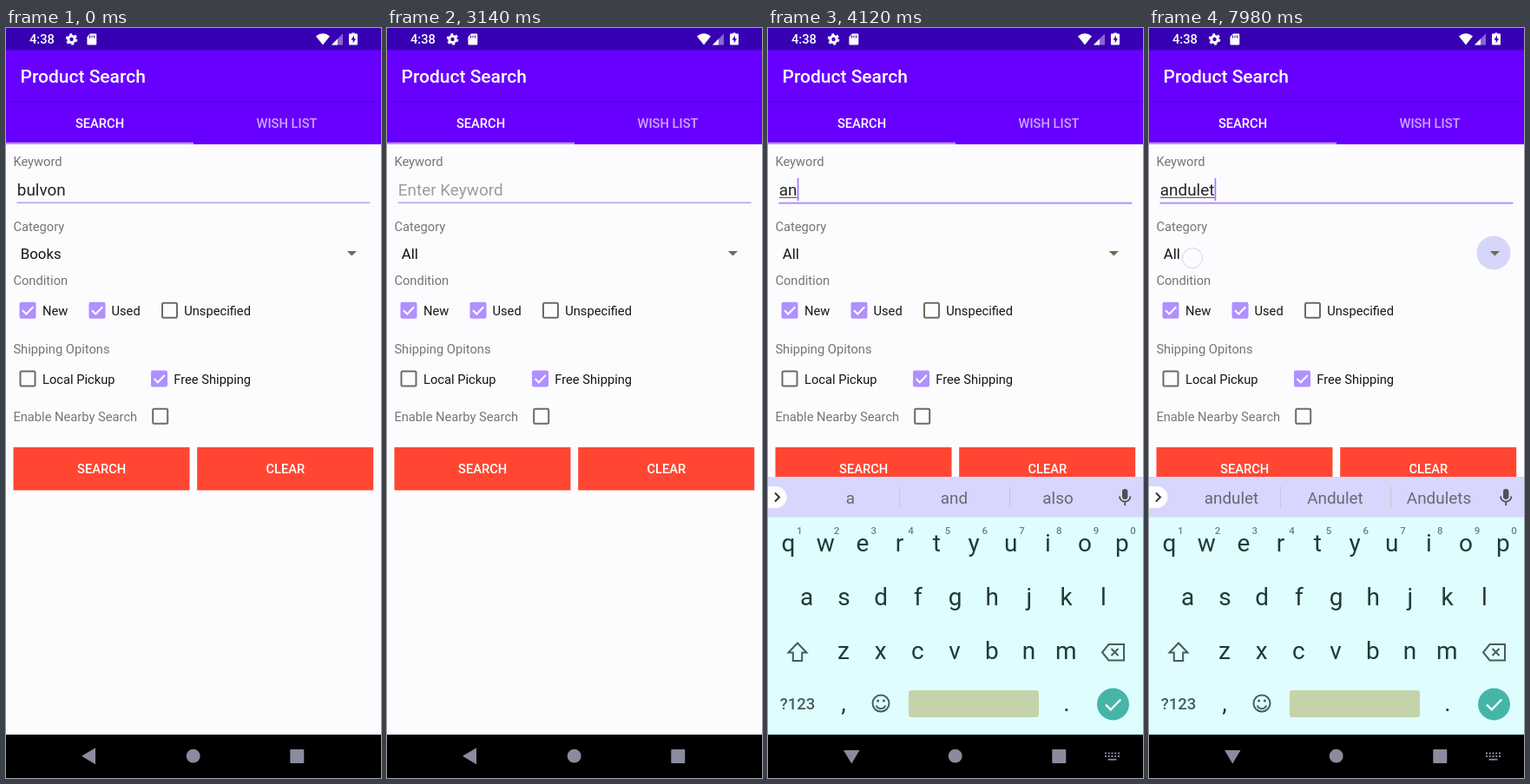
Recreate the animation shown at these times as an HTML page. Size 432 px wide and 864 px high, loop 8000 ms.

```html
<!DOCTYPE html>
<html lang="en">
<head>
<meta charset="utf-8">
<title>Product Search</title>
<style>
html, body { margin: 0; width: 100%; height: 100%; overflow: hidden; background: #fcfcff; }
svg { display: block; width: 100vw; height: 100vh; font-family: Roboto, sans-serif; }
text { white-space: pre; }
.mid { text-anchor: middle; }
.med { font-weight: 500; }
</style>
</head>
<body>
<svg id="stage" viewBox="0 0 432 864">
  <rect width="432" height="864" fill="#fcfcff"/>

  <!-- status bar, toolbar and tabs -->
  <rect width="432" height="134" fill="#6800ff"/>
  <rect width="432" height="25.5" fill="#3700b3"/>
  <rect y="84.5" width="432" height="1" fill="#5200d8"/>
  <g fill="#fff" class="med">
    <text x="27" y="18" font-size="14.7">4:38</text>
    <circle cx="75.5" cy="13" r="3.7" fill="none" stroke="#fff" stroke-width="3"/>
    <circle cx="75.5" cy="13" r="5.8" fill="none" stroke="#fff" stroke-width="2" stroke-dasharray="3 3.07"/>
    <path d="M97 6.5h6a1.3 1.3 0 0 1 1.3 1.3v10.4a1.3 1.3 0 0 1-1.3 1.3h-8.3a1.3 1.3 0 0 1-1.3-1.3V10.300z"/>
    <path d="M96.500 8.500v3M99 8.500v3M101.500 8.500v3" stroke="#3700b3"/>
    <path d="M357 9.500Q365 3 373 9.500L365 19.500z"/>
    <path d="M388 6.500v13h-13z" opacity=".4"/>
    <path d="M382 12.500v7h-7z"/>
    <path d="M398.500 6.500v-1h3v1h2.500a1 1 0 0 1 1 1v11a1 1 0 0 1-1 1h-8a1 1 0 0 1-1-1v-11a1 1 0 0 1 1-1z"/>
    <path d="M401 8.500l-3.500 5.300h2.200v3.700l3.300-5.200h-2z" fill="#3700b3"/>
    <text x="16.500" y="62.700" font-size="21">Product Search</text>
    <g font-size="14.7" class="mid">
      <text x="108" y="115">SEARCH</text>
      <text x="323.500" y="115" fill="#cba6ff">WISH LIST</text>
    </g>
  </g>
  <rect y="131.700" width="216" height="2.300" fill="#bb90ff"/>

  <!-- form -->
  <g font-size="14.7" fill="#757575">
    <text x="8.400" y="158.500">Keyword</text>
    <text x="8.400" y="234.300">Category</text>
    <text x="8.400" y="296">Condition</text>
    <text x="8.400" y="374.500">Shipping Opitons</text>
    <text x="8.400" y="453">Enable Nearby Search</text>
  </g>
  <rect id="line" x="12.500" width="407" y="200.700"/>
  <text id="word" x="12.800" y="193.200" font-size="18.9"/>
  <rect id="under" x="13" y="194.800" height="1" fill="#444"/>
  <rect id="caret" y="173" width="1.700" height="26" fill="#a375ff"/>
  <circle id="ripple" cx="397" cy="259" fill="#d6d6fb"/>
  <text id="cat" x="16.800" y="266" font-size="16.8" fill="#151515"/>
  <path d="M392.800 257h11.200l-5.600 5.600z" fill="#6c6c58"/>
  <g id="checks" font-size="14.7" fill="#151515"></g>
  <g id="buttons" font-size="14.7" class="mid med"></g>

  <!-- navigation bar and keyboard -->
  <rect y="814" width="432" height="50"/>
  <g id="keyboard">
    <rect id="keysBg" y="517" width="432" height="297"/>
    <rect y="517" width="432" height="46.500" fill="#d7d6fd"/>
    <path d="M0 528h9a12.500 12.500 0 0 1 0 25H0z" fill="#fff"/>
    <path d="M8 535.500l5 5-5 5" fill="none" stroke="#333" stroke-width="2"/>
    <path id="divider" d="M151.500 528v25" stroke="#c6c6e0"/>
    <path d="M278.500 528v25" stroke="#c6c6d0"/>
    <g id="hints" class="mid" font-size="18.9" fill="#646b73">
      <text x="95" y="547.500"/><text x="214.500" y="547.500"/><text x="334" y="547.500"/>
    </g>
    <rect x="408" y="531" width="6.400" height="12" rx="3.200" fill="#505050"/>
    <path d="M405 539.500a6.200 6.200 0 0 0 12.400 0M411.200 546v4" fill="none" stroke="#505050" stroke-width="1.800"/>
    <g id="keys" class="mid" font-size="28"></g>
    <g fill="none" stroke="#495c5c" stroke-width="2">
      <path d="M34 708.500l10.500 11h-5.300v9.500h-10.400v-9.500h-5.300z"/>
      <path d="M392.500 710H410v18.500h-17.500l-7.500-9.250zM395.500 715l8 8M403.500 715l-8 8"/>
      <circle cx="130" cy="778" r="9.500"/>
      <path d="M124.800 780.500a5.500 5.500 0 0 0 10.400 0"/>
    </g>
    <g fill="#495c5c">
      <circle cx="126.600" cy="775" r="1.500"/><circle cx="133.400" cy="775" r="1.500"/>
      <text x="34" y="785" font-size="18.500" class="mid med">?123</text>
    </g>
    <rect x="162" y="763" width="150" height="31" rx="3" fill="#c5d3aa"/>
    <circle cx="397.500" cy="779" r="18.500" fill="#45b5a8"/>
    <path d="M389 779.500l5.800 5.800 11.500-11.800" fill="none" stroke="#fff" stroke-width="2.300"/>
  </g>
  <g fill="#8b8b9f">
    <path id="back"/>
    <circle cx="215.700" cy="838.700" r="7.900"/>
    <rect x="327.300" y="831" width="16" height="16" rx="1"/>
    <path id="kbIcon" d="M388 835.500h17M388 839h17" stroke="#8b8b9f" stroke-width="2" stroke-dasharray="2 1.750"/>
    <path id="kbBar" d="M391.500 842.700h10" stroke="#8b8b9f" stroke-width="1.800"/>
  </g>
  <circle id="touch" r="11.500" fill="#fff" fill-opacity=".45" stroke="#cfcff5"/>
</svg>
<script>
const LOOP = 8000;
const KB_START = 3400, KB_TIME = 400, KB_TRAVEL = 80;
const $ = id => document.getElementById(id);
const set = (el, attrs) => { for (const k in attrs) el.setAttribute(k, attrs[k]); };
const clamp = v => Math.max(0, Math.min(1, v));
const last = (list, t) => list.filter(item => item[0] <= t).pop();

// time, text in the field
const typed = [
  [0, "bulvon"], [2500, ""], [4120, "an"], [4250, "and"], [4370, "ando"],
  [4550, "andole"], [4640, "andolet"], [5390, "andole"], [5700, "andol"],
  [5880, "ando"], [6270, "and"], [6400, "andu"], [6520, "andul"],
  [6640, "andule"], [6760, "andulet"]
];
// time, three suggestions
const hints = [
  [0, "thanks", "I", "we"],
  [4120, "a", "and", "also"],
  [4250, "and", "and I", "and the"],
  [4400, "andoi", "and I", "and if"],
  [4640, "andolet", "andulet", "Andulet"],
  [5700, "andoi", "and I", "and if"],
  [6320, "and", "and I", "and the"],
  [6560, "andul", "andulet", "Andulet"],
  [6880, "andulet", "Andulet", "Andulets"]
];
// start, end, x, y
const touches = [[2400, 2620, 333, 516], [3230, 3400, 120, 179], [7760, 8100, 50, 265]];
const caretOff = [[3940, 4120], [7780, 7960]];

function checkbox(x, y, on, label, labelX) {
  const box = on
    ? `<rect x="${x}" y="${y}" width="19" height="19" rx="2" fill="#b090ff"/>
       <path d="M${x + 3.5} ${y + 9.5}l4.300 4.300 8-8.300" fill="none" stroke="#fff" stroke-width="2"/>`
    : `<rect x="${x + 1}" y="${y + 1}" width="17" height="17" rx="1.500" fill="none" stroke="#6c6c60" stroke-width="2"/>`;
  return box + `<text x="${labelX}" y="${y + 15.2}">${label}</text>`;
}

$("checks").innerHTML =
  checkbox(15.5, 315.7, true, "New", 42) +
  checkbox(95.5, 315.7, true, "Used", 121.5) +
  checkbox(179, 315.7, false, "Unspecified", 205.2) +
  checkbox(15.5, 394.5, false, "Local Pickup", 42) +
  checkbox(167, 394.5, true, "Free Shipping", 193.3) +
  checkbox(168.2, 437.7, false, "", 0);

$("buttons").innerHTML = [["SEARCH", 8.5], ["CLEAR", 220.2]].map(([label, x]) =>
  `<rect x="${x}" y="483" width="203" height="49.500" fill="#ff4632"/>
   <text x="${x + 101.6}" y="513.300" fill="#fff">${label}</text>`).join("");

function keyRow(chars, x, y) {
  return [...chars].map((c, i) => `<text x="${x + i * 42.7}" y="${y}">${c}</text>`).join("");
}
$("keys").innerHTML = `<g fill="#203a38">${
  keyRow("qwertyuiop", 23.5, 603) + keyRow("asdfghjkl", 44.7, 665) +
  keyRow("zxcvbnm", 87, 727) + keyRow(",", 87, 787) + keyRow(".", 344, 787)
}</g><g font-size="11.500" fill="#6e7f80" class="med">${keyRow("1234567890", 36.3, 583)}</g>`;

function draw(t) {
  const focused = t >= KB_START;
  const text = last(typed, t)[1];
  const word = $("word");
  word.textContent = text || "Enter Keyword";
  set(word, { fill: text ? "#252525" : "#9b9b9b" });
  const width = text ? word.getComputedTextLength() : 0;
  set($("under"), { width: focused ? width : 0 });
  set($("line"), { height: focused ? 2 : 1, fill: focused ? "#b58fff" : "#8080dc" });

  const blink = caretOff.some(([a, b]) => t >= a && t < b);
  set($("caret"), { x: 13 + width, opacity: focused && !blink ? 1 : 0 });
  $("cat").textContent = t < 2500 ? "Books" : "All";

  const rest = Math.pow(1 - clamp((t - KB_START) / KB_TIME), 5);
  set($("keyboard"), { transform: `translate(0 ${KB_TRAVEL * rest})`, opacity: 1 - rest });
  set($("keysBg"), { fill: t < 3600 ? "#fcfdff" : "#dffdff" });
  set($("divider"), { opacity: t < 3600 ? 0 : 1 });
  const words = last(hints, t);
  [...$("hints").children].forEach((el, i) => { el.textContent = words[i + 1]; });

  set($("back"), { d: focused ? "M87 832h18.500l-9.250 15.500z" : "M87 838.700l16-9.500v19z" });
  set($("kbIcon"), { opacity: focused ? 1 : 0 });
  set($("kbBar"), { opacity: focused ? 1 : 0 });

  const touch = touches.find(([a, b]) => t >= a && t < b);
  if (touch) set($("touch"), { cx: touch[2], cy: touch[3], opacity: clamp((touch[1] - t) / 100) });
  else set($("touch"), { opacity: 0 });

  const grow = clamp((t - 7780) / 180);
  set($("ripple"), { r: 19.5 * Math.sqrt(grow), opacity: grow });
}

const start = performance.now();
function tick() {
  draw((performance.now() - start) % LOOP);
  requestAnimationFrame(tick);
}
tick();
</script>
</body>
</html>
```
